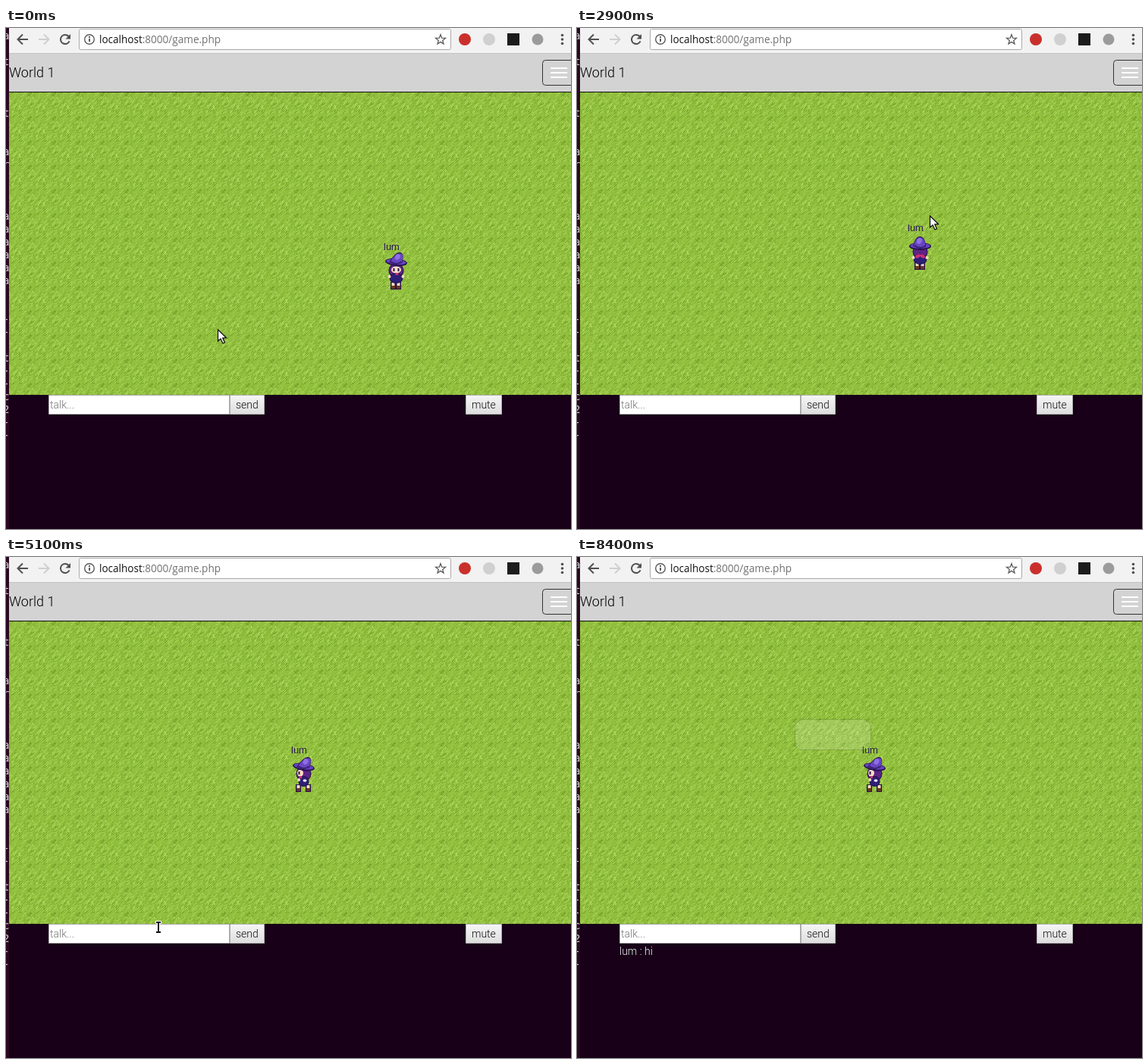
These frames come from a looping animation (745x661 px, 8.5 s). An HTML page with a canvas:

```html
<!DOCTYPE html>
<html lang="en">
<head>
<meta charset="utf-8">
<title>World 1</title>
<style>
html, body { margin: 0; width: 100%; height: 100%; overflow: hidden; background: #170018; }
canvas { display: block; }
</style>
</head>
<body>
<canvas id="stage" width="745" height="661"></canvas>
<script>
const LOOP = 8500, STEP = 100, NAME = 'lum';
const LIGHT = '300 14px Roboto, sans-serif';
const stage = document.getElementById('stage');
let g = stage.getContext('2d');

const clamp = (v, lo, hi) => Math.min(hi, Math.max(lo, v));
const mix = (a, b, p) => a + (b - a) * p;
const ease = p => p * p * (3 - 2 * p);

function rect(color, x, y, w, h) {
  g.fillStyle = color;
  g.fillRect(x, y, w, h);
}

function oval(color, x, y, rx, ry = rx, turn = 0) {
  g.beginPath();
  g.ellipse(x, y, rx, ry, turn, 0, 7);
  g.fillStyle = color;
  g.fill();
}

function trace(p) {
  g.beginPath();
  for (let i = 0; i < p.length; i += 2) g.lineTo(p[i], p[i + 1]);
}

function poly(color, ...p) {
  trace(p);
  g.fillStyle = color;
  g.fill();
}

function stroke(color, width) {
  g.strokeStyle = color;
  g.lineWidth = width;
  g.stroke();
}

function line(color, width, ...p) {
  trace(p);
  stroke(color, width);
}

function ring(color, width, x, y, r, from = 0, to = 7) {
  g.beginPath();
  g.arc(x, y, r, from, to);
  stroke(color, width);
}

function box(fill, edge, x, y, w, h, r = 0) {
  g.beginPath();
  g.roundRect(x + .5, y + .5, w - 1, h - 1, r);
  g.fillStyle = fill;
  g.fill();
  stroke(edge, 1);
}

function text(str, x, y, color, font) {
  g.font = font;
  g.fillStyle = color;
  g.fillText(str, x, y);
}

// One repeating tile of short blades, all leaning to the right.
function makeGrass() {
  const tile = document.createElement('canvas'), size = 32;
  tile.width = tile.height = size;
  const c = tile.getContext('2d');
  let seed = 11;
  const pick = n => (seed = seed * 16807 % 2147483647) % n;
  c.fillStyle = '#92c03e';
  c.fillRect(0, 0, size, size);
  const tones = ['#78a62c', '#acd65a', '#82b032', '#a2cc4e'];
  for (let i = 0; i < 200; i++) {
    const x = pick(size), y = pick(size), len = 2 + pick(3);
    c.fillStyle = tones[i % tones.length];
    for (let k = 0; k < len; k++) c.fillRect((x + k) % size, (y - k + size) % size, 1, 1);
  }
  return g.createPattern(tile, 'repeat');
}
const grass = makeGrass();

function terminalEdge() {
  rect('#2b0821', 0, 0, 4, 661);
  g.save();
  g.beginPath();
  g.rect(0, 0, 4, 661);
  g.clip();
  [...'a t   t  ar   aaaaaa  -- t--c2--'].forEach((ch, i) =>
    text(ch, -4, 15 + i * 17, '#d6cfd4', '14px "DejaVu Sans Mono", monospace'));
  g.restore();
}

function arrowIcon(x, color, dir) {
  line(color, 2, x - 7 * dir, 15, x + 7 * dir, 15);
  line(color, 2, x, 8.5, x - 6.5 * dir, 15, x, 21.5);
}

function star(x, y, r) {
  g.beginPath();
  for (let i = 0; i < 10; i++) {
    const d = i % 2 ? r * .42 : r, a = i * Math.PI / 5 - Math.PI / 2;
    g.lineTo(x + d * Math.cos(a), y + d * Math.sin(a));
  }
  g.closePath();
  stroke('#5a5a5a', 1.3);
}

function toolbar() {
  rect('#f2f2f2', 4, 0, 741, 33);
  rect('#c4c4c4', 4, 33, 741, 1);
  arrowIcon(22, '#505050', 1);
  arrowIcon(50, '#cfcfcf', -1);
  ring('#505050', 2, 78, 15, 6, .4, 5.6);
  poly('#505050', 85, 8, 85, 14.5, 78.5, 14.5);
  box('#fff', '#a9a9a9', 96, 1, 491, 28, 2);
  ring('#5a5a5a', 1.4, 110, 15, 6.3);
  rect('#5a5a5a', 109, 14, 2, 4);
  rect('#5a5a5a', 109, 11, 2, 2);
  const font = '13.55px "Open Sans", "Noto Sans", sans-serif';
  text('localhost', 123, 20, '#111', font);
  text(':8000/game.php', 123 + g.measureText('localhost').width, 20, '#707070', font);
  star(573, 15.5, 6.8);
  oval('#c9302c', 605, 15, 8);
  oval('#d0d0d0', 637, 15, 8);
  rect('#1c1c1c', 661, 7, 16, 16);
  oval('#9b9b9b', 701, 15, 7.5);
  for (let i = -1; i < 2; i++) oval('#505050', 733.5, 15 + i * 5.5, 1.8);
}

function header() {
  rect('#d3d3d3', 4, 34, 741, 50);
  rect('#111', 4, 84, 741, 1);
  text('World 1', 4, 65, '#000', '300 18px Roboto, sans-serif');
  box('#d3d3d3', '#333', 707, 42, 44, 34, 4);
  for (let i = 0; i < 3; i++) rect('#fff', 718, 52 + i * 6, 22, 2);
}

function button(label, x, w) {
  const fade = g.createLinearGradient(0, 484, 0, 510);
  fade.addColorStop(0, '#f6f6f6');
  fade.addColorStop(1, '#dddddd');
  box(fade, '#b0b0b0', x, 484, w, 26);
  text(label, x + 8, 502, '#111', LIGHT);
}

function chat(t) {
  const focus = t >= 5400 && t < 6600;
  const typed = focus ? 'hi'.slice(0, clamp(Math.floor((t - 5800) / 200), 0, 2)) : '';
  box('#fff', focus ? '#6c68c8' : '#a9a9a9', 56, 484, 239, 26);
  text(typed || 'talk...', 58, 502, typed ? '#222' : '#757575', LIGHT);
  if (focus) rect('#111', 58 + Math.round(typed && g.measureText(typed).width), 489, 1, 16);
  button('send', 295, 46);
  button('mute', 606, 48);
  if (focus && t >= 6100) {
    rect('#fff', 57, 511, 240, 24);
    text('hi', 65, 528, '#111', 'bold 14px "Open Sans", "Noto Sans", sans-serif');
  }
  if (t >= 6600) text(NAME + ' : hi', 56, 525, '#f4f0f4', LIGHT);
}

const INK = '#25104f', VIOLET = '#6845c2', SHINE = '#8e6fe6', SKIN = '#f9dcc3',
  HAIR = '#5d2484', ROBE = '#2d1f78', ROSE = '#c2386a', BOOT = '#6a3620';

function leg(x, foot) {
  rect(INK, x - 3.5, foot - 10, 7, 10);
  rect(SKIN, x - 2, foot - 9, 4, 4);
  rect(BOOT, x - 2.5, foot - 5, 5, 4);
}

function hat(top, tilt, lean) {
  const brim = top + 13;
  const cone = (color, half, y) => {
    g.beginPath();
    g.moveTo(16 - half, brim);
    g.quadraticCurveTo(11 + lean, y, 17 + lean, y);
    g.quadraticCurveTo(24 + lean, y, 17 + half * .8, brim + 1);
    g.quadraticCurveTo(16, brim + 4, 16 - half, brim);
    g.fillStyle = color;
    g.fill();
  };
  oval(INK, 16.5, brim, 14.5, 5, tilt);
  oval(VIOLET, 16.5, brim - .5, 13, 3.6, tilt);
  cone(INK, 9, top);
  cone(VIOLET, 8, top + 1.2);
  oval(SHINE, 16 + lean * .6, top + 6, 3.2, 4, .5);
  ring('#37206f', 1.8, 16.5, brim - 8, 10, .8, 2.4);
}

// Units run from the name's left edge and centre line.
function witch(dir, gait) {
  const left = dir === 'left', up = dir === 'up', foot = left || up ? 56 : 57;
  const spread = left ? (gait % 2 ? 6.5 : 1.5) : 3.5;
  for (const side of [1, -1]) {
    const lift = up && gait % 2 && side === gait - 2 ? 2 : 0;
    leg(16 + side * spread, foot - lift);
  }
  oval(INK, 16.5, 32, 10, 10);
  oval(HAIR, 16.5, 32, 9, 9);
  oval(INK, 16.5, 42, left ? 7 : 9, 7);
  oval(ROBE, 16.5, 42, left ? 6 : 8, 6);
  if (up) {
    for (const side of [-1, 1]) oval('#d12d78', 16.5 + side * 3, 38, 3.5, 2.2, side * .5);
  } else {
    const x = left ? 12 : 16.5;
    oval(SKIN, x, 31, left ? 4 : 6.5, 4.5);
    for (const eye of left ? [-1.5] : [-3, 3]) rect(INK, x + eye - 1, 29, 2, 4);
    rect(ROSE, x - 1, 35, left ? 3 : 4, 3);
    if (left) oval('#ece4f8', 18, 41, 2.5, 1.8);
  }
  for (const side of left ? [-.7] : [-1, 1]) oval(SKIN, 16.5 + side * 9, 40, 2);
  if (left) hat(10, .16, 5);
  else if (up) hat(12, 0, -1);
  else hat(8, .1, 4);
}

// The walk goes left, up, then left again at one speed.
function player(t) {
  const sideways = 62, rise = 34, total = 156;
  const d = clamp(Math.floor((t - 1180) * .0507), 0, total);
  const up = clamp(d - sideways, 0, rise);
  const dir = !d ? 'down' : up > 0 && up < rise ? 'up' : 'left';
  g.save();
  g.translate(498 - (d - up), 288 - up);
  witch(dir, Math.floor(Math.min(t, 4300) / 200) % 4);
  text(NAME, 0, 5, '#2d1b52', '13px "Liberation Sans", Arial, sans-serif');
  g.restore();
}

function bubble(t) {
  if (t < 6600) return;
  const fade = 1 - ease(clamp((t - 7500) / 1200, 0, 1));
  g.save();
  g.globalAlpha = fade;
  box('rgba(255,255,255,.96)', '#111', 287, 214, 101, 41, 10);
  g.globalAlpha = fade * fade;
  poly('#fff', 365, 254, 378, 254, 378, 268);
  line('#111', 1, 364.5, 254.5, 378.5, 268.5, 378.5, 254.5);
  text('hi', 297, 234, '#111', '10px Roboto, sans-serif');
  g.restore();
}

const REST = [465, 247], FIELD = [197, 499];
const GLIDES = [
  [0, 100, [279, 397], [262, 405]],
  [100, 500, [262, 405], REST],
  [4300, 4700, REST, [239, 389]],
  [4700, 5200, [239, 389], FIELD],
  [7200, 7300, FIELD, [137, 97]],
];

function mouse(t) {
  if (t >= 7400) return;
  const [from, to, a, b] = GLIDES.filter(glide => glide[0] <= t).pop();
  const p = ease(clamp((t - from) / (to - from), 0, 1));
  const x = Math.round(mix(a[0], b[0], p)), y = Math.round(mix(a[1], b[1], p));
  g.save();
  g.translate(x, y);
  if (y > 484) {
    for (const [color, pad] of [['#fff', 1], ['#111', 0]]) {
      rect(color, -1 - pad, -6, 2 + 2 * pad, 12);
      for (const end of [-7, 6]) rect(color, -3 - pad, end - pad, 6 + 2 * pad, 2 + 2 * pad);
    }
  } else {
    trace([.5, 1, .5, 16, 4, 13, 7, 19, 9.5, 18, 6.7, 12, 11.5, 11.7]);
    g.closePath();
    g.fillStyle = '#fff';
    g.fill();
    stroke('#111', 1.3);
  }
  g.restore();
}

function draw(now) {
  const t = Math.floor(now % LOOP / STEP) * STEP;
  rect('#170018', 0, 0, 745, 661);
  terminalEdge();
  toolbar();
  header();
  g.save();
  g.translate(4, 85);
  rect(grass, 0, 0, 741, 399);
  g.restore();
  player(t);
  chat(t);
  bubble(t);
  mouse(t);
}

const start = performance.now();
function tick() {
  draw(performance.now() - start);
  requestAnimationFrame(tick);
}
tick();
</script>
</body>
</html>
```
